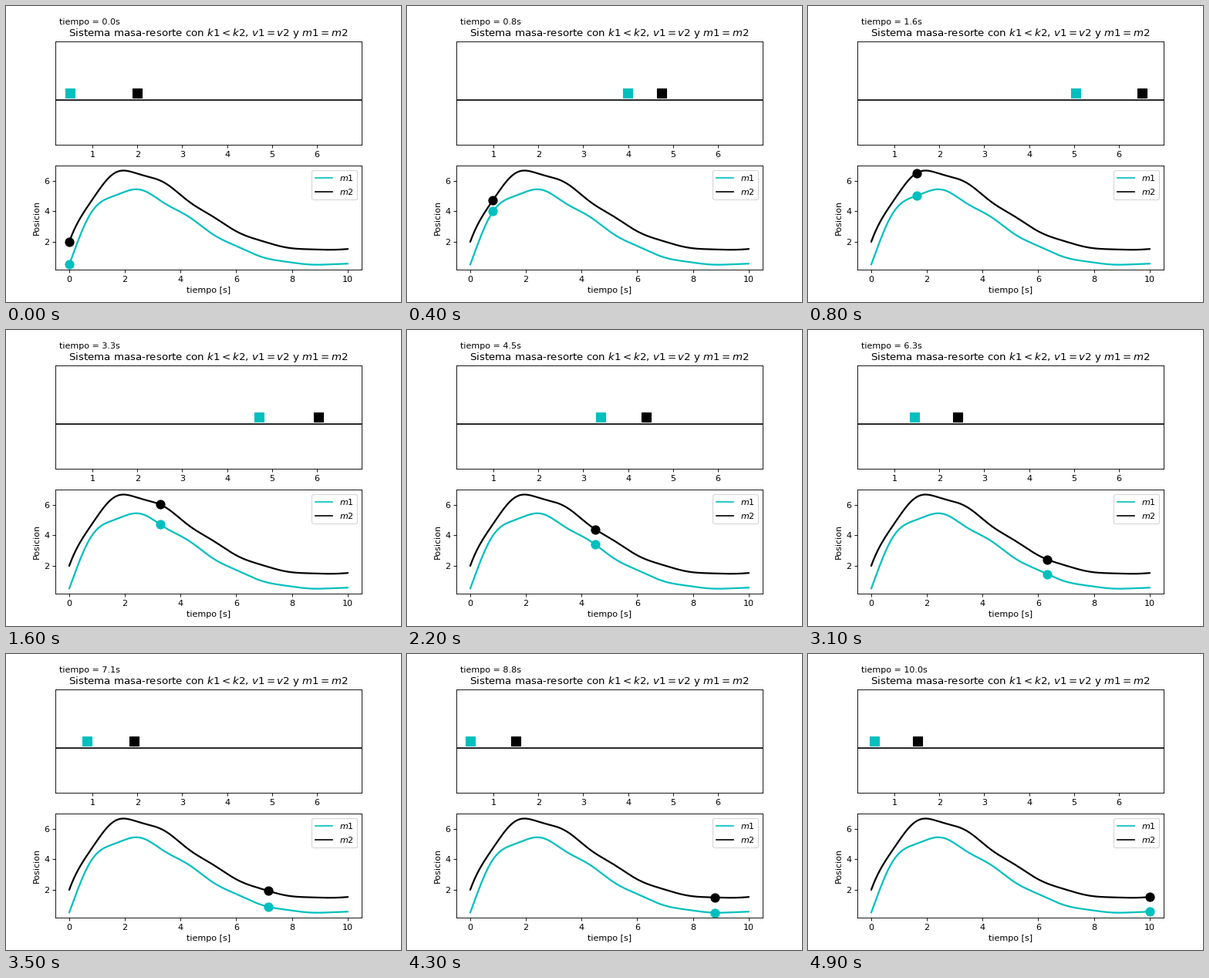
Animation, 512 px wide and 384 px high, one loop 5000 ms. Source, as a matplotlib script:

```python
import numpy as np
import matplotlib.pyplot as plt
from matplotlib.animation import FuncAnimation
from matplotlib.lines import Line2D

FRAMES, DURATION = 50, 10.0
MASS, FRICTION = 1.6, 1.0
K1, K2 = 1.0, 10.0
REST = np.array([1.0, 2.0])
START = np.array([0.5, 2.0])
SPEED = np.array([5.0, 5.0])
COLORS = ("c", "k")

plt.rcParams["font.family"] = "DejaVu Sans"


def positions(t):
    """Positions of both masses: sum of the two damped normal modes."""
    stiffness = np.array([[K1 + K2, -K2], [-K2, K2]]) / MASS
    squares, modes = np.linalg.eigh(stiffness)
    decay = FRICTION / (2 * MASS)
    omega = np.sqrt(squares - decay**2)
    q = modes.T @ (START - REST)
    dq = modes.T @ SPEED
    phase = np.outer(omega, t)
    swing = (q[:, None] * np.cos(phase)
             + ((dq + decay * q) / omega)[:, None] * np.sin(phase))
    return REST[:, None] + modes @ (np.exp(-decay * t) * swing)


fig, (track, graph) = plt.subplots(2, 1, figsize=(6.4, 4.8), dpi=80)

# Position against time
fine_t = np.linspace(0, DURATION, 500)
for curve, color in zip(positions(fine_t), COLORS):
    graph.plot(fine_t, curve, color=color, lw=2)
graph.set_xlabel("tiempo [s]")
graph.set_ylabel("Posicion")
graph.legend([Line2D([], [], color=c, lw=1.5) for c in COLORS],
             ["$m1$", "$m2$"], loc="upper right")
limits = graph.get_ylim()
graph.set_ylim(limits)
graph.set_xlim(graph.get_xlim())

# Masses on the floor
track.set_title("Sistema masa-resorte con $k1<k2$, $v1=v2$ y $m1=m2$")
track.set_xlim(limits)
track.set_ylim(-0.055, 0.055)
track.set_yticks([])
track.axhline(-0.007, color="k", lw=1.5)
clock = track.text(0.25, 0.073, "")

blocks = [track.plot([], [], "s", color=c, ms=10)[0] for c in COLORS]
dots = [graph.plot([], [], "o", color=c, ms=10)[0] for c in COLORS]

times = np.linspace(0, DURATION, FRAMES)
path = positions(times)


def update(i):
    clock.set_text(f"tiempo = {times[i]:.1f}s")
    for block, dot, x in zip(blocks, dots, path[:, i]):
        block.set_data([x], [0])
        dot.set_data([times[i]], [x])
    return [clock, *blocks, *dots]


anim = FuncAnimation(fig, update, frames=FRAMES, interval=100, repeat=True)
plt.show()
```
